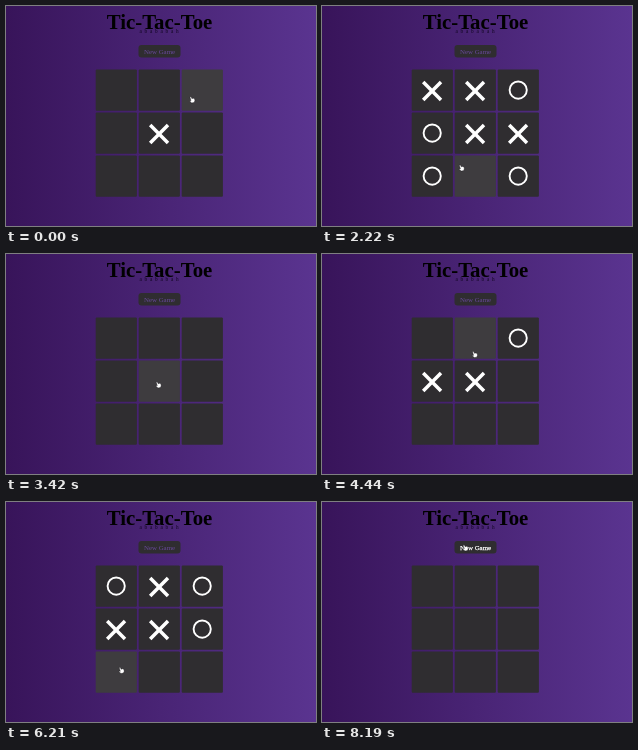
Recreate the animation shown at these times as an HTML page. Size 310x220 px, loop 8220 ms.

```html
<!DOCTYPE html>
<html lang="en">
<head>
<meta charset="utf-8">
<title>Tic-Tac-Toe</title>
<style>
  html, body { margin: 0; width: 100%; height: 100%; overflow: hidden; background: #38145a; }
  svg { display: block; width: 310px; height: 220px; }
  text { font-family: "Liberation Serif", "Times New Roman", serif; text-anchor: middle; }
  .cell, .button { fill: #2f2d30; }
  .cell.hover { fill: #3e3c3f; }
  .label { font-size: 6.9px; fill: #69499c; }
  .label.hover { fill: #fff; stroke: #fff; stroke-width: .25px; }
  .mark { fill: none; stroke: #fff; }
</style>
</head>
<body>
<svg id="stage" viewBox="0 0 310 220">
  <defs>
    <linearGradient id="bg">
      <stop offset="0" stop-color="#38145a"/>
      <stop offset="1" stop-color="#5a3490"/>
    </linearGradient>
  </defs>
  <rect width="310" height="220" fill="url(#bg)"/>
  <text x="153.5" y="22.5" font-size="20.8" font-weight="bold">Tic-Tac-Toe</text>
  <text x="154.5" y="26.5" font-size="5.2" letter-spacing="2.8" fill="#10051f">abababah</text>
  <rect class="button" x="132.5" y="39" width="42" height="12.5" rx="3"/>
  <text class="label" id="label" x="153.5" y="47.6">New Game</text>
  <g id="board"></g>
  <text id="message" x="153.5" y="205.5" font-size="12" font-weight="bold"></text>
  <path id="hand" d="M-2.8-2.8q.8-.8 1.3 0l.7 1.5 1.5-.4 1.3.8.2 1.8-.8 1.7-2.4.4-2-1.8q-.1-.8.8-.6l.5.2z"
        fill="#fff" stroke="#161417" stroke-width=".4" stroke-linejoin="round"/>
</svg>
<script>
const LOOP = 8220, PACE = 320, TRAVEL = 400;
const PITCH = 43, SIZE = 41.2;
const BUTTON = { x: 144, y: 46 };
const $ = id => document.getElementById(id);

// Cells in playing order, X first; "slow" stretches the pauses move by move
const games = [
  { start: -260, slow: 0, order: "420853167", end: 3000, result: "X wins!" },
  { start: 3480, slow: 30, order: "42351068", end: 8100, result: "O wins!" }
];

const col = i => i % 3 - 1;
const row = i => Math.floor(i / 3) - 1;

// Pointer stops: it sets off for each cell right after the previous click
const stops = [];
for (const g of games) {
  g.moves = [...g.order].map((c, k) => ({ cell: +c, at: g.start + PACE * k + g.slow * k * k }));
  g.moves.forEach(({ cell }, k) => stops.push({
    leave: k ? g.moves[k - 1].at : g.start - 480,
    x: 153 + 37 * col(cell),
    y: 131 + 38 * row(cell)
  }));
  stops.push({ leave: g.end - TRAVEL, ...BUTTON });
}

function pointer(t) {
  let i = stops.length - 1;
  while (stops[i].leave > t) i--;
  const a = stops[i - 1] || BUTTON, b = stops[i], next = stops[i + 1];
  const time = Math.min(TRAVEL, next ? next.leave - b.leave : TRAVEL);
  const p = Math.min(1, (t - b.leave) / time), e = p * p * (3 - 2 * p);
  const dx = b.x - a.x, bow = dx * dx / 180 * 4 * e * (1 - e);
  return [a.x + dx * e, a.y + (b.y - a.y) * e - bow];
}

function add(parent, tag, attrs) {
  const el = document.createElementNS("http://www.w3.org/2000/svg", tag);
  for (const k in attrs) el.setAttribute(k, attrs[k]);
  return parent.appendChild(el);
}

const cells = Array.from({ length: 9 }, (_, i) => {
  const x = 132.7 + PITCH * col(i), y = 106.6 + PITCH * row(i);
  const g = add($("board"), "g", { transform: `translate(${x} ${y})` });
  return {
    x, y,
    box: add(g, "rect", { class: "cell", width: SIZE, height: SIZE, rx: 1 }),
    X: add(g, "path", { class: "mark", d: "M11.5 12.5l17.8 17.8m0-17.8l-17.8 17.8", "stroke-width": 3.5 }),
    O: add(g, "circle", { class: "mark", cx: 20.5, cy: 20.5, r: 8.6, "stroke-width": 1.9 })
  };
});

const inside = (px, py, x, y, w, h) => px >= x && px <= x + w && py >= y && py <= y + h;
const show = (el, on) => el.setAttribute("visibility", on ? "visible" : "hidden");

function draw(t) {
  const [x, y] = pointer(t);
  $("hand").setAttribute("transform", `translate(${x} ${y})`);
  $("label").classList.toggle("hover", inside(x, y, 132.5, 39, 42, 12.5));

  const game = games.find(g => t >= g.start && t < g.end);
  const marks = [];
  if (game) game.moves.forEach(({ cell, at }, k) => { if (t >= at) marks[cell] = "XO"[k % 2]; });
  cells.forEach((c, i) => {
    c.box.classList.toggle("hover", inside(x, y, c.x, c.y, SIZE, SIZE));
    show(c.X, marks[i] === "X");
    show(c.O, marks[i] === "O");
  });

  const over = game && t >= game.moves[game.moves.length - 1].at;
  $("message").textContent = over ? game.result : "";
}

const begin = performance.now();
function tick() {
  draw((performance.now() - begin) % LOOP);
  requestAnimationFrame(tick);
}
tick();
</script>
</body>
</html>
```
